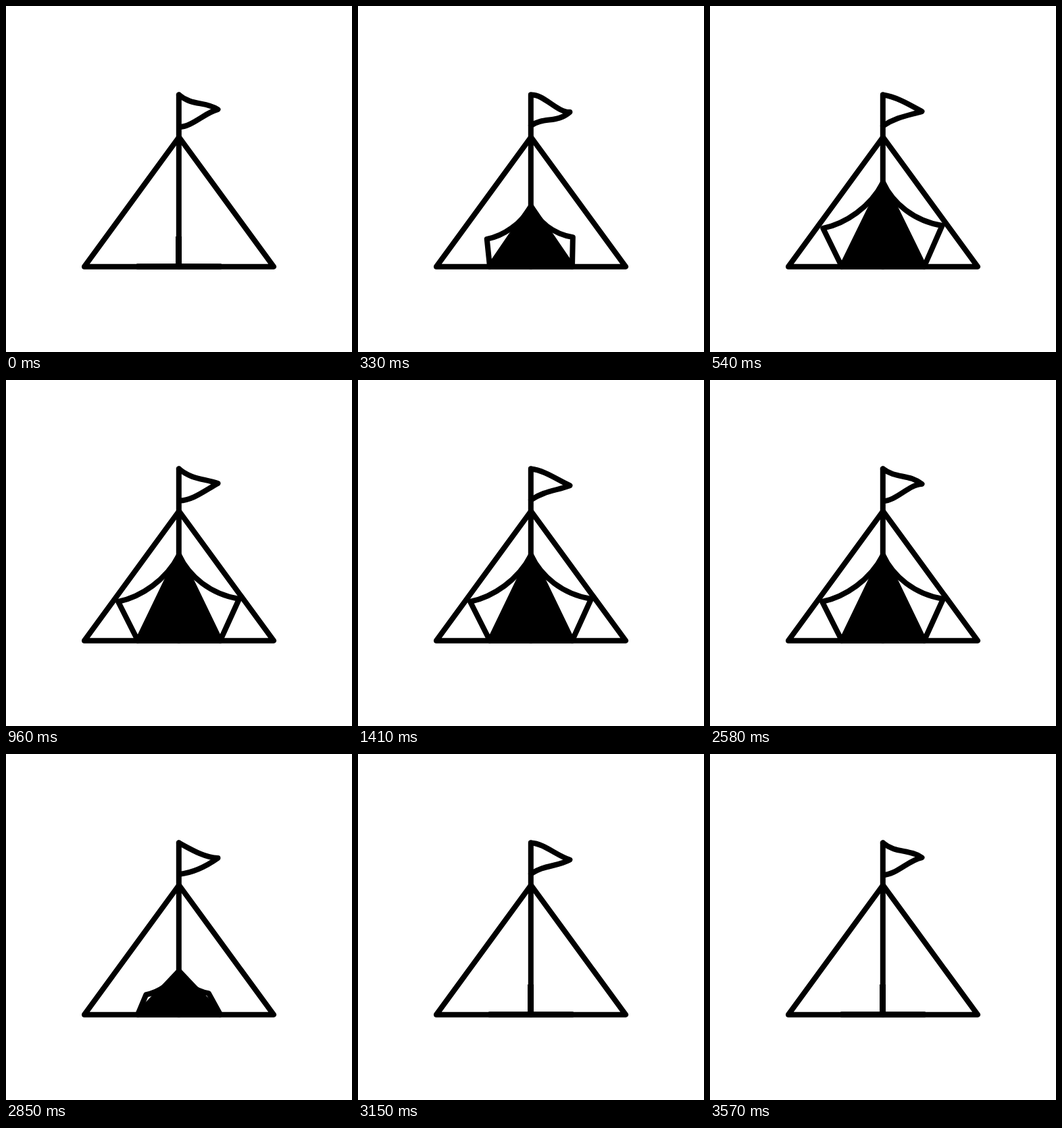
Write an HTML page that moves like this. It is 512 px wide and 512 px high and loops after 3.6 s.

```html
<!DOCTYPE html>
<html lang="en">
<head>
<meta charset="utf-8">
<title>Tent</title>
<style>
  html, body { margin: 0; width: 100%; height: 100%; overflow: hidden; background: #fff; }
  svg { display: block; width: 100vw; height: 100vh; }
  path { fill: none; stroke: #000; stroke-width: 8; stroke-linecap: round; stroke-linejoin: round; }
  .seam { stroke-width: 9; stroke-linecap: butt; }
  .door { fill: #000; animation: door 3.6s infinite; }
  .flaps { animation: flaps 3.6s infinite; }
  .flag { animation: flag .9s linear infinite; }

  @keyframes door {
    0% {
      d: path("M195 385.5L256 385.5L317 385.5Z");
      animation-timing-function: cubic-bezier(.167, .167, .667, 1);
    }
    16.4% { d: path("M195 385.5L256 259L317 385.5Z"); }
    73.06% {
      d: path("M195 385.5L256 259L317 385.5Z");
      animation-timing-function: cubic-bezier(.333, 0, .75, .9);
    }
    84.17%, 100% { d: path("M195 385.5L256 385.5L317 385.5Z"); }
  }

  @keyframes flaps {
    0% {
      d: path("M195 385.5L250 385.5C252 385.5 254 385.5 256 385.5C255 385.5 254 385.5 253 385.5L317 385.5");
      animation-timing-function: cubic-bezier(.167, .167, .667, 1);
    }
    16.4% { d: path("M195 385.5L166 328C200 321 237 296 256 259C271 291 303 317 345 324L317 385.5"); }
    73.06% {
      d: path("M195 385.5L166 328C200 321 237 296 256 259C271 291 303 317 345 324L317 385.5");
      animation-timing-function: cubic-bezier(.333, 0, .75, .9);
    }
    84.17%, 100% { d: path("M195 385.5L250 385.5C252 385.5 254 385.5 256 385.5C255 385.5 254 385.5 253 385.5L317 385.5"); }
  }

  @keyframes flag {
    0%, 100% { d: path("M256 131.5C275 148 294.5 140.7 313.5 153C294.5 157.5 275 179 256 179"); }
    6.67% { d: path("M256 131.5C275 147.8 294.5 145.7 313.5 153C294.5 163.5 275 179 256 178.5"); }
    16.67% { d: path("M256 131.5C275 141.9 294.5 153.3 313.5 154C294.5 167.5 275 176 256 178"); }
    36.67% { d: path("M256 131.5C275 130 294.5 157.8 313.5 157C294.5 173.7 275 163.8 256 177"); }
    61.67% { d: path("M256 131.5C275 134.3 294.5 144.7 313.5 156C294.5 161 275 164.5 256 177.5"); }
    86.67% { d: path("M256 131.5C275 146.2 294.5 138.8 313.5 154C294.5 154.3 275 179.5 256 179"); }
  }
</style>
</head>
<body>
<svg viewBox="0 0 512 512">
  <path d="M116 385.7L256 194L396 385.7Z"/>
  <path d="M255.8 131.5V385.7"/>
  <path class="seam" d="M255.5 341V385"/>
  <path class="door" d="M195 385.5L256 385.5L317 385.5Z"/>
  <path class="flaps" d="M195 385.5L317 385.5"/>
  <path class="flag" d="M256 131.5C275 148 294.5 140.7 313.5 153C294.5 157.5 275 179 256 179"/>
</svg>
</body>
</html>
```
